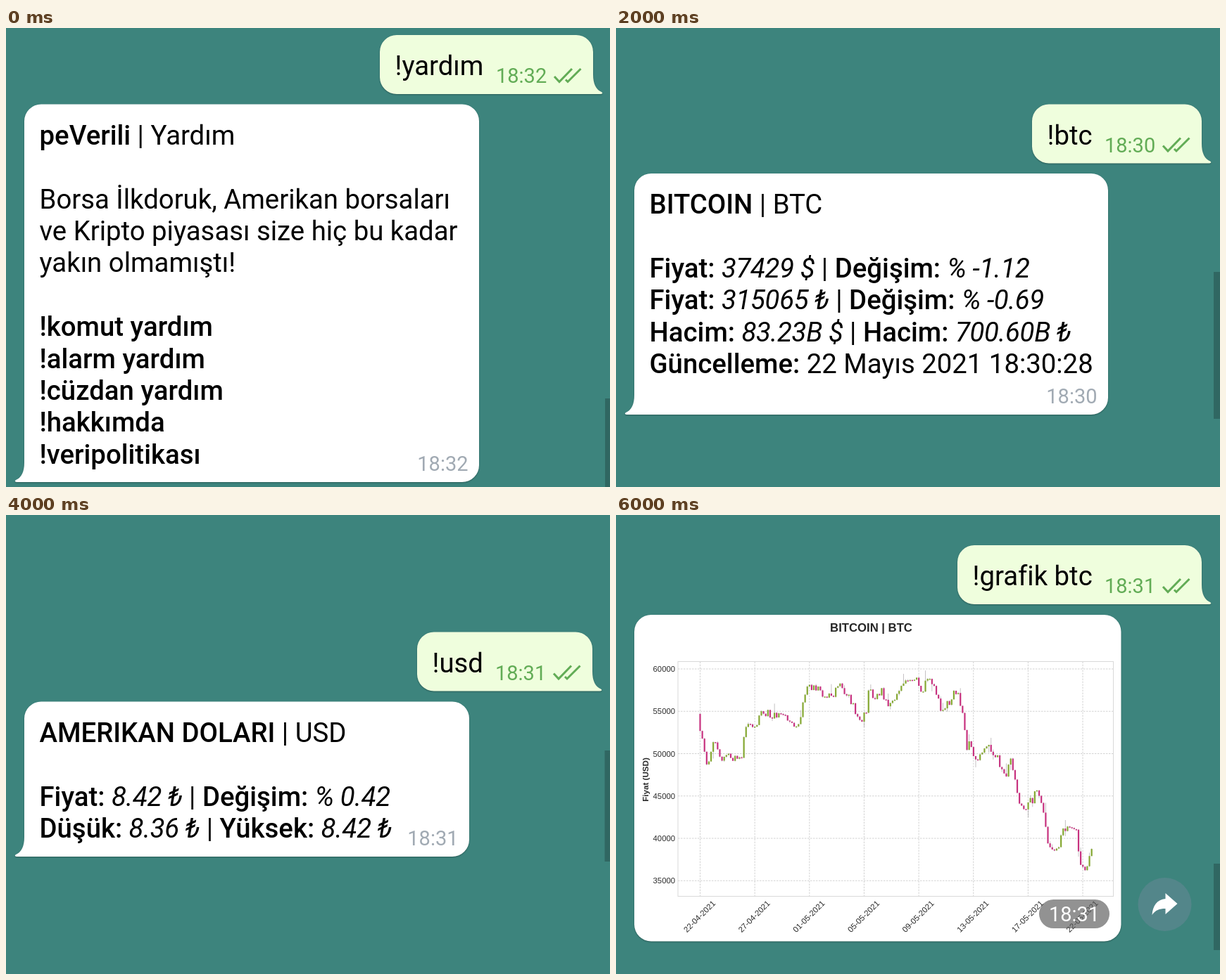
Recreate the animation shown at these times as an HTML page with a canvas. Size 858 by 653 pixels, loop 7000 ms.

```html
<!DOCTYPE html>
<html lang="tr">
<head>
<meta charset="utf-8">
<title>Bot komutları</title>
<style>
  html, body { margin: 0; width: 100%; height: 100%; overflow: hidden; background: #3d847d; }
  canvas { display: block; }
</style>
</head>
<body>
<canvas id="stage" width="858" height="653"></canvas>
<script>
const ctx = document.getElementById('stage').getContext('2d');
const SCENE_MS = 1000;
const TEXT_SIZE = 38.35, TIME_SIZE = 29, LINE = 45.4;

// In reply lines, *bold* and _italic_ mark the style of a run.
const scenes = [
  {
    ask: { text: '!yardım', left: 531, right: 834, top: 10 }, time: '18:32',
    reply: { top: 108.5, bottom: 646, right: 672 }, bar: [851, 527, 653],
    lines: ['*peVerili* | Yardım', '', 'Borsa İlkdoruk, Amerikan borsaları',
      've Kripto piyasası size hiç bu kadar', 'yakın olmamıştı!', '', '*!komut yardım*',
      '*!alarm yardım*', '*!cüzdan yardım*', '*!hakkımda*', '*!veripolitikası*']
  },
  {
    ask: { text: '!komut yardım', left: 413, right: 833, top: 75 }, time: '18:32',
    reply: { top: 173.5, bottom: 574.5, right: 571.5 }, bar: [850, 478, 582],
    lines: ['*peVerili* | Komut Yardım', '', '*!{BILK Kodu}*', '*!{KRİPTO PARA Kodu}*',
      '*!{AMERİKAN Hisse Kodu}.US*', '*!{ALTIN}*', '', '*!grafik {KOD}*']
  },
  {
    ask: { text: '!btc', left: 591, right: 832, top: 108.5 }, time: '18:30',
    reply: { top: 207, bottom: 550, right: 699 }, bar: [849, 347, 556],
    lines: ['*BITCOIN* | BTC', '', '*Fiyat:* _37429 $_ | *Değişim:* _% -1.12_',
      '*Fiyat:* _315065 ₺_ | *Değişim:* _% -0.69_',
      '*Hacim:* _83.23B $_ | *Hacim:* _700.60B ₺_',
      '*Güncelleme:* 22 Mayıs 2021 18:30:28']
  },
  {
    ask: { text: '!ruval', left: 555.5, right: 832, top: 53.5 }, time: '18:31',
    reply: { top: 152, bottom: 598, right: 706 }, bar: [849, 448, 608],
    lines: ['*RUVA ALTIN* | RUVAL', '', '*Fiyat:* _128.40 ₺_ | *Değişim:* _% -1.23_',
      '*Düşük:* _128.40 ₺_ | *Yüksek:* _131.00 ₺_',
      '*Taban:* _117.00 ₺_ | *Tavan:* _143.00 ₺_', '*Hacim:* _544.66M ₺_',
      '*---------------[BETA]---------------*',
      '*Destek:* _128.00 ₺_ | *Direnç:* _129.80 ₺_',
      '*----[Yatırım Tavsiyesi Değildir]----*']
  },
  {
    ask: { text: '!usd', left: 584, right: 833, top: 166.5 }, time: '18:31',
    reply: { top: 265.5, bottom: 486, right: 658 }, bar: [850.5, 335, 493],
    lines: ['*AMERIKAN DOLARI* | USD', '', '*Fiyat:* _8.42 ₺_ | *Değişim:* _% 0.42_',
      '*Düşük:* _8.36 ₺_ | *Yüksek:* _8.42 ₺_']
  },
  {
    ask: { text: '!xau', left: 585, right: 832.5, top: 166.5 }, time: '18:31',
    reply: { top: 265, bottom: 485, right: 721 }, bar: [850, 369, 493],
    lines: ['*KÜLÇE ALTIN (USD)* | XAU', '', '*Fiyat:* _1881.40_ | *Değişim:* _% 0.23_',
      '*Düşük:* _1870.19_ | *Yüksek:* _1889.38_']
  },
  {
    ask: { text: '!grafik btc', left: 485, right: 832, top: 43 }, time: '18:31',
    reply: { top: 142, bottom: 606.5, right: 717.5 }, bar: [849, 496, 619],
    chart: true
  }
];

// Turning points of the price line: x, y, x, y ...
const trend = [
  119, 300, 125, 334, 129, 350, 132, 345, 138, 329, 144, 331, 151, 349, 160, 333, 166, 345,
  175, 340, 179, 353, 182, 313, 188, 299, 200, 293, 209, 278, 222, 285, 240, 285, 250, 302,
  263, 288, 266, 257, 275, 241, 290, 248, 297, 260, 308, 258, 312, 242, 319, 235, 330, 262,
  337, 266, 341, 290, 350, 290, 356, 276, 359, 251, 371, 257, 377, 245, 384, 267, 392, 264,
  400, 248, 417, 232, 425, 233, 434, 252, 444, 229, 450, 241, 461, 277, 468, 273, 483, 248,
  489, 264, 495, 304, 498, 332, 502, 325, 510, 355, 525, 328, 540, 344, 554, 374, 562, 347,
  567, 382, 576, 418, 585, 411, 598, 396, 608, 425, 614, 468, 626, 478, 633, 455, 640, 440,
  655, 452, 659, 497, 669, 508, 673, 479, 677, 481
];

const roboto = (size, style = '') => `${style} ${size}px Roboto, sans-serif`;
const arial = (size, style = '') => `${style} ${size}px "Liberation Sans", Arial, sans-serif`;

function write(text, x, y, font, color, align = 'left') {
  ctx.font = font;
  ctx.fillStyle = color;
  ctx.textAlign = align;
  ctx.fillText(text, x, y);
}

function writeTurned(text, x, y, angle, font) {
  ctx.save();
  ctx.translate(x, y);
  ctx.rotate(angle);
  write(text, 0, 4, font, '#2b2b2b', 'center');
  ctx.restore();
}

function writeRich(line, x, y) {
  for (const run of line.match(/\*[^*]+\*|_[^_]+_|[^*_]+/g) || []) {
    const style = { '*': '500', '_': 'italic' }[run[0]];
    const text = style ? run.slice(1, -1) : run;
    ctx.letterSpacing = style === 'italic' ? '-0.33px' : '0px';
    write(text, x, y, roboto(TEXT_SIZE, style), '#000');
    x += ctx.measureText(text).width;
  }
  ctx.letterSpacing = '0px';
}

// The path has its tail at the left; side 1 mirrors it, side 0 has none.
function bubble(left, right, top, bottom, color, side) {
  const w = right - left, h = bottom - top, r = 24;
  ctx.save();
  ctx.translate(side > 0 ? right : left, top);
  if (side > 0) ctx.scale(-1, 1);
  ctx.beginPath();
  ctx.moveTo(r, 0);
  ctx.arcTo(w, 0, w, h, r);
  ctx.arcTo(w, h, 0, h, r);
  if (side) {
    ctx.lineTo(-11, h);
    ctx.quadraticCurveTo(-15, h - 1, -12, h - 3);
    ctx.quadraticCurveTo(0, h - 8, 0, h - 28);
  } else {
    ctx.arcTo(0, h, 0, 0, r);
  }
  ctx.arcTo(0, 0, w, 0, r);
  ctx.closePath();
  ctx.shadowColor = 'rgba(0,0,0,.3)';
  ctx.shadowBlur = 2;
  ctx.shadowOffsetY = 1;
  ctx.fillStyle = color;
  ctx.fill();
  ctx.restore();
}

function line(points, color, width) {
  ctx.beginPath();
  points.forEach(([x, y]) => ctx.lineTo(x, y));
  ctx.strokeStyle = color;
  ctx.lineWidth = width;
  ctx.stroke();
}

function drawAsk({ text, left, right, top }, time) {
  const green = '#62ac56';
  bubble(left, right, top, top + 84, '#effedd', 1);
  write(text, left + 21.5, top + 57.2, roboto(TEXT_SIZE), '#000');
  write(time, right - 138, top + 68.2, roboto(TIME_SIZE), green);
  const x = right - 56, y = top + 48;
  line([[x + 1, y + 11], [x + 8, y + 18.5], [x + 26, y]], green, 3);
  line([[x + 17, y + 15.5], [x + 20, y + 18.5], [x + 38.5, y]], green, 3);
}

function drawReply({ top, bottom, right }, lines, time) {
  lines.forEach((text, i) => writeRich(text, 47.5, top + 57.2 + i * LINE));
  write(time, right - 15.5, bottom - 15.8, roboto(TIME_SIZE), '#a1aab3', 'right');
}

const noise = n => {
  const v = Math.sin(n * 127.1 + 4.7) * 43758.5453;
  return v - Math.floor(v);
};

function trendAt(x) {
  let i = 2;
  while (i < trend.length - 2 && trend[i] < x) i += 2;
  const [x0, y0, x1, y1] = trend.slice(i - 2, i + 2);
  return y0 + (y1 - y0) * (x - x0) / (x1 - x0);
}

function drawCandles() {
  let open = 283;
  for (let i = 0; i < 180; i++) {
    const x = 119.5 + i * 3.107;
    const close = trendAt(x) + (noise(i) - 0.5) * 14;
    const high = Math.min(open, close), low = Math.max(open, close);
    const reach = k => 1.5 * noise(i + k) + 14 * noise(i + k) ** 24;
    line([[x, high - reach(300)], [x, low + reach(600)]], 'rgba(110,100,105,.5)', 0.8);
    ctx.fillStyle = close < open ? '#85a832' : '#c7327f';
    ctx.fillRect(x - 1.1, high, 2.2, Math.max(1.5, low - high));
    open = close;
  }
}

function drawChart(time) {
  const days = ['22-04', '27-04', '01-05', '05-05', '09-05', '13-05', '17-05', '22-05'];
  write('BITCOIN | BTC', 362.5, 166, arial(16.7, 'bold'), '#262626', 'center');
  writeTurned('Fiyat (USD)', 41.5, 376.5, -Math.PI / 2, arial(11.6, 'bold'));

  ctx.setLineDash([2.5, 1.5]);
  days.forEach((day, i) => {
    const x = 119.5 + i * 77.65;
    line([[x, 208.5], [x, 542.5]], '#d2d2d2', 1);
    writeTurned(day + '-2021', x - 1, 571, -Math.PI / 4, arial(11.4));
  });
  for (let i = 0; i < 6; i++) {
    const y = 219 + i * 60.25;
    line([[88, y], [706.5, y]], '#d2d2d2', 1);
    write(60000 - i * 5000, 84, y + 4, arial(11.3), '#2b2b2b', 'right');
  }
  ctx.setLineDash([]);
  ctx.strokeStyle = '#d9d9d9';
  ctx.strokeRect(88, 208.5, 618.5, 334);
  drawCandles();

  ctx.fillStyle = 'rgba(90,90,90,.66)';
  ctx.beginPath();
  ctx.roundRect(601, 547, 100, 41, 20.5);
  ctx.fill();
  write(time, 651, 577.5, roboto(TIME_SIZE), '#fff', 'center');
  drawShare(779.5, 554);
}

function drawShare(x, y) {
  ctx.fillStyle = '#53868a';
  ctx.beginPath();
  ctx.arc(x, y, 38, 0, 7);
  ctx.fill();
  ctx.save();
  ctx.translate(x, y);
  ctx.fillStyle = '#fff';
  ctx.beginPath();
  ctx.moveTo(18, -1);
  ctx.lineTo(1, -16);
  ctx.lineTo(1, -8);
  ctx.bezierCurveTo(-11, -7, -17, 2, -18, 15);
  ctx.bezierCurveTo(-13, 8, -8, 6, 1, 6);
  ctx.lineTo(1, 14);
  ctx.closePath();
  ctx.fill();
  ctx.restore();
}

function draw({ ask, time, reply, bar, lines, chart }) {
  ctx.fillStyle = '#3d847d';
  ctx.fillRect(0, 0, 858, 653);
  drawAsk(ask, time);
  bubble(26, reply.right, reply.top, reply.bottom, '#fff', chart ? 0 : -1);
  if (chart) drawChart(time);
  else drawReply(reply, lines, time);
  const [x, top, bottom] = bar;
  ctx.fillStyle = 'rgba(0,0,0,.22)';
  ctx.fillRect(x, top, 858 - x, bottom - top);
}

const start = performance.now();
function tick() {
  const elapsed = Math.max(0, performance.now() - start);
  draw(scenes[Math.floor(elapsed / SCENE_MS) % scenes.length]);
  requestAnimationFrame(tick);
}
tick();
</script>
</body>
</html>
```
